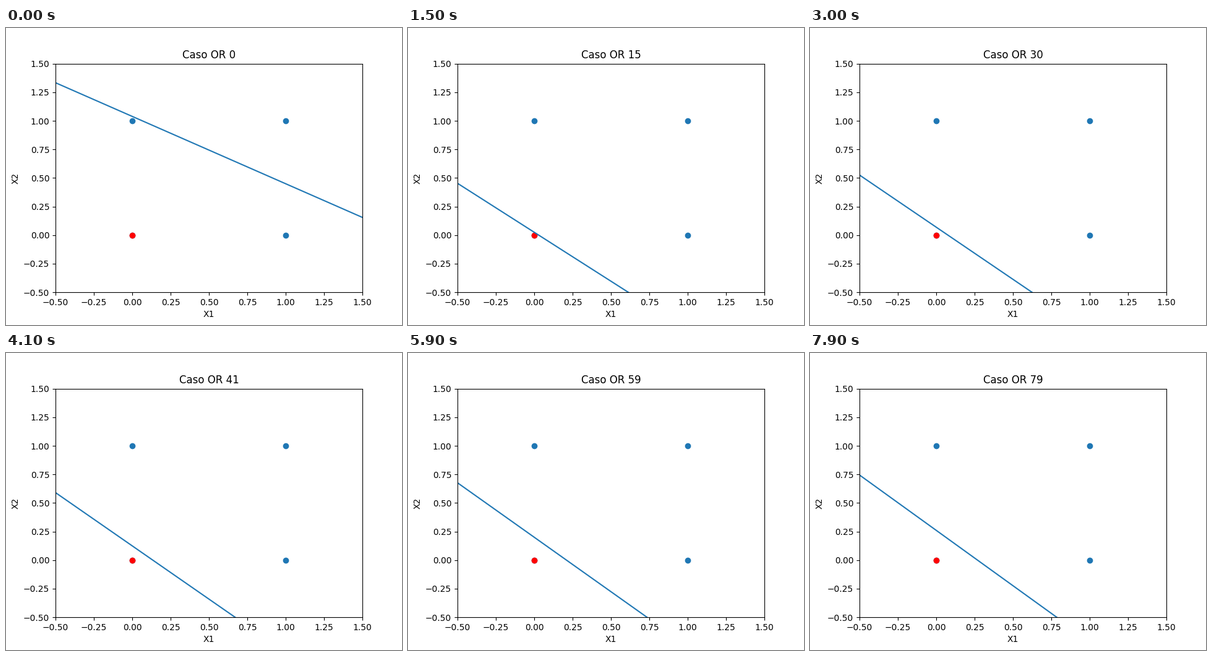
Recreate the animation shown at these times as a matplotlib script. Size 640 by 480 pixels, loop 8000 ms.

```python
import numpy as np
import matplotlib.pyplot as plt
from matplotlib.animation import FuncAnimation

FRAMES = 80
INTERVAL = 100  # ms


def boundary(n):
    """Slope and intercept of the decision line after n training steps."""
    slope = -1 + 0.1531 * np.exp(-0.0198 * n) + 0.258 * np.exp(-0.1434 * n)
    intercept = (0.40 - 0.5774 * np.exp(-0.018 * n)
                 + 0.694 * np.exp(-0.157 * n)
                 + 0.522 * np.exp(-0.5 * n))
    return slope, intercept


fig, ax = plt.subplots(figsize=(6.4, 4.8), dpi=100)
ax.set_xlim(-0.5, 1.5)
ax.set_ylim(-0.5, 1.5)
ax.set_xlabel("X1")
ax.set_ylabel("X2")
title = ax.set_title("Caso OR 0")

ax.scatter([0, 0, 1, 1], [0, 1, 0, 1])
ax.scatter([0], [0], color="red")

xs = np.array([-1.0, 2.0])
line, = ax.plot(xs, xs)


def update(n):
    slope, intercept = boundary(n)
    line.set_ydata(slope * xs + intercept)
    title.set_text(f"Caso OR {n}")
    return line, title


anim = FuncAnimation(fig, update, frames=FRAMES, interval=INTERVAL,
                     repeat=True, repeat_delay=0)
plt.show()
```
